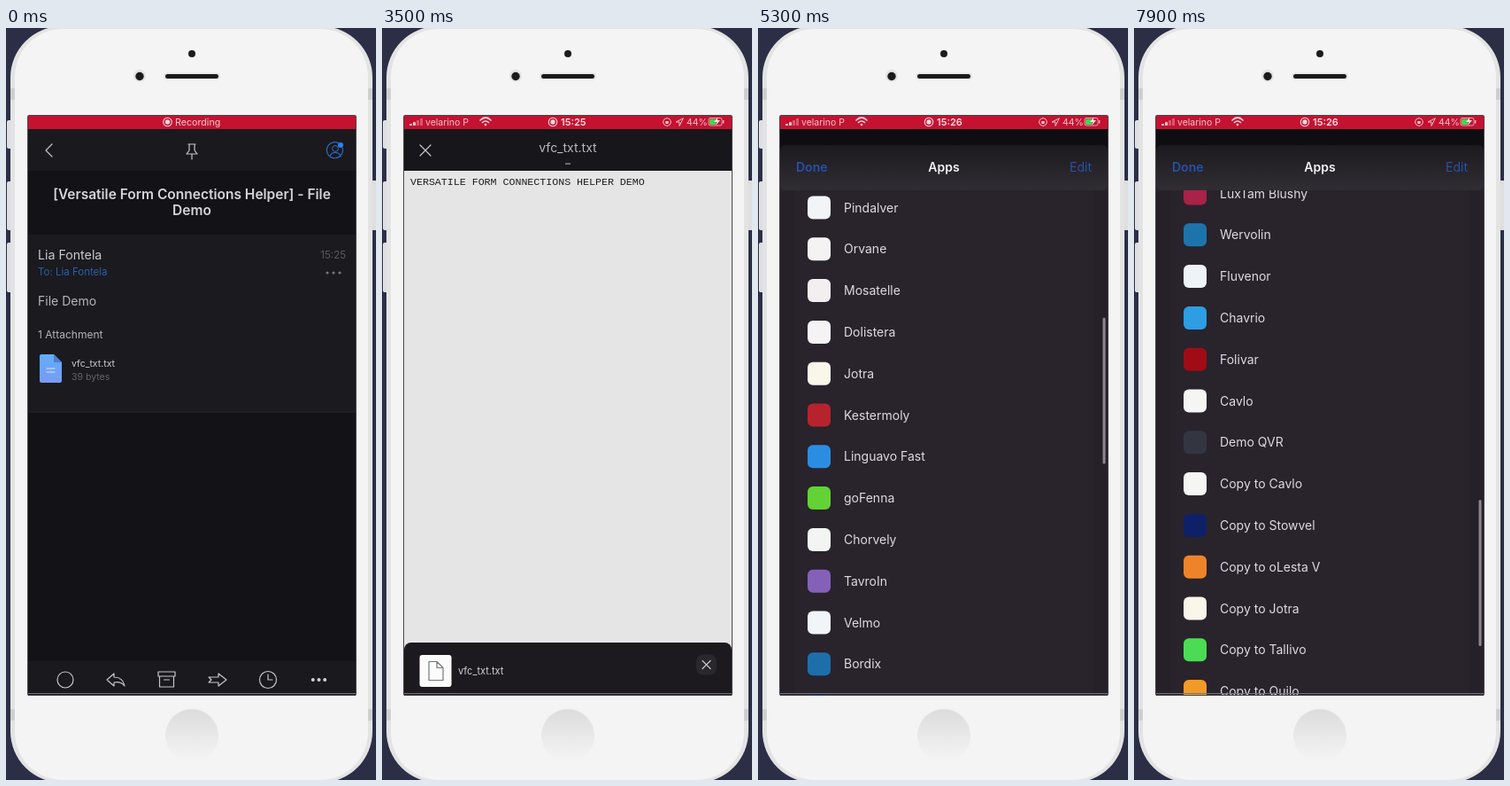
An HTML page for the animation above (8 s loop, 418 by 848 pixels).

```html
<!DOCTYPE html>
<html lang="en">
<head>
<meta charset="utf-8">
<title>Opening an attachment</title>
<style>
html, body { margin: 0; width: 100%; height: 100%; overflow: hidden; background: #2b2e45; }
svg { display: block; width: 418px; height: 848px; font-family: Inter, Roboto, sans-serif; }
.line { fill: none; stroke: #c6c5c9; stroke-width: 1.2; stroke-linecap: round; stroke-linejoin: round; }
</style>
</head>
<body>
<svg id="stage" viewBox="0 0 418 848"></svg>
<script>
const LOOP = 8000, STEP = 100;
const ROW = 46.8, FIRST_ROW = 308.5;
const FILE = 'vfc_txt.txt', PERSON = 'Lia Fontela';

const rect = (x, y, w, h, fill, r = 0, extra = '') =>
  `<rect x="${x}" y="${y}" width="${w}" height="${h}" rx="${r}" fill="${fill}" ${extra}/>`;
const circle = (x, y, r, fill, extra = '') =>
  `<circle cx="${x}" cy="${y}" r="${r}" fill="${fill}" ${extra}/>`;
const text = (x, y, size, fill, label, extra = '') =>
  `<text x="${x}" y="${y}" font-size="${size}" fill="${fill}" ${extra}>${label}</text>`;
const line = (d, extra = '') => `<path class="line" d="${d}" ${extra}/>`;
const group = (id, body) => `<g id="${id}">${body}</g>`;
const cross = (x, y, r) => line(`M${x - r} ${y - r}l${2 * r} ${2 * r}m0 ${-2 * r}l${-2 * r} ${2 * r}`);
const dots = (x, y, gap, r, fill) => [-1, 0, 1].map(i => circle(x + i * gap, y, r, fill)).join('');
const MID = 'text-anchor="middle"', END = 'text-anchor="end"', BOLD = 'font-weight="600"';

// name, tile colour
const apps = [
  ['Tomalune', '#2064b4'], ['Quillmar', '#55d365'], ['Drune', '#1f57ae'], ['Bravoli', '#515aa8'],
  ['Tresk', '#f4f2f4'], ['Pindalver', '#f2f4f8'], ['Orvane', '#f4f2f2'], ['Mosatelle', '#f3eef0'],
  ['Dolistera', '#f6f3f5'], ['Jotra', '#faf6ea'], ['Kestermoly', '#b5242d'], ['Linguavo Fast', '#2b8de2'],
  ['goFenna', '#62d234'], ['Chorvely', '#f2f5f2'], ['TavroIn', '#8560b8'], ['Velmo', '#f1f5f8'],
  ['Bordix', '#1d6fab'], ['Stowvel', '#0e2168'], ['Qorde', '#f0eff5'], ['Zivel', '#f6f1f2'],
  ['LuxTam Blushy', '#a82347'], ['Wervolin', '#1d74ab'], ['Fluvenor', '#edf3f7'], ['Chavrio', '#2d9de4'],
  ['Folivar', '#a00c16'], ['Cavlo', '#f5f5f3'], ['Demo QVR', '#333640'], ['Copy to Cavlo', '#f5f5f3'],
  ['Copy to Stowvel', '#0e2168'], ['Copy to oLesta V', '#ee842a'], ['Copy to Jotra', '#faf6ea'],
  ['Copy to Tallivo', '#4cdb55'], ['Copy to Quilo', '#f29a27']
];
const favorites = [['Skyvano', '#f2f4f8'], ['Textalia', '#55d365'], ['Pelu', '#2b91e8']];

const appRow = (y, [name, color]) =>
  rect(56, y - 13, 26, 26, color, 6) + text(97, y + 5, 14, '#dedbe0', name);

function phone() {
  const buttons = [[1, 104, 32], [1, 173, 55], [1, 242, 56], [412, 172, 56]]
    .map(([x, y, h]) => rect(x, y, 7, h, '#dfdfe1', 2)).join('');
  const seams = [68, 768].map(y => rect(5, y, 5, 13, '#cfcfd1') + rect(409, y, 5, 13, '#cfcfd1')).join('');
  return rect(0, 0, 418, 848, '#2b2e45') + buttons +
    rect(5, -2, 409, 853, '#e3e3e4', 58) + seams +
    rect(10, 1, 399, 847, '#f4f4f4', 54) +
    circle(210, 29, 4, '#1c1a1c') +
    circle(151, 54, 7, '#e4e4e5') + circle(151, 54.5, 4.7, '#1c1a1c') +
    rect(178, 50.5, 64, 8, '#e6e6e6', 4) + rect(180, 52, 60, 5, '#1c1a1c', 2.5) +
    circle(210, 798, 30, 'url(#home)');
}

function letter() {
  const blue = 'style="stroke:#2b6cc9"';
  return rect(25, 99, 370, 654, '#131217') +
    rect(25, 114, 370, 47, '#1a191e') + rect(25, 233, 370, 199, '#1b1a1f') +
    rect(25, 432, 370, 2, '#1f1e23') + rect(25, 714, 370, 38, '#1a191e') +
    line('M52 131l-7 7 7 7', 'stroke-width="1.5"') +
    line('M206 131h8m-7 0v7l-3 4h12l-3-4v-7m-3 11v6') +
    line('M376 130a9 9 0 1 0 4 5M366 145c1-6 11-6 12 0', blue) +
    circle(372, 136, 3.4, 'none', blue) + circle(378, 132, 3, '#2f7ff0') +
    text(210, 193, 15.5, '#d6d5d9', '[Versatile Form Connections Helper] - File', `${MID} ${BOLD}`) +
    text(210, 211, 15.5, '#d6d5d9', 'Demo', `${MID} ${BOLD}`) +
    text(36, 261, 14.2, '#cbcace', PERSON) +
    text(384, 260, 11.5, '#5b5a60', '15:25', END) +
    text(36, 279, 11.5, '#2a5fab', `To: ${PERSON}`) +
    dots(370, 276, 7, 1.6, '#77767b') +
    text(36, 313, 14, '#b7b6ba', 'File Demo') +
    text(36, 350, 12, '#b7b6ba', '1 Attachment') +
    '<path d="M40 368h14l9 9v21a2 2 0 0 1-2 2H40a2 2 0 0 1-2-2V370a2 2 0 0 1 2-2z" fill="url(#doc)"/>' +
    '<path d="M54 368l9 9h-9z" fill="#4b7fd2"/>' +
    line('M46 384h9m-9 4h9', 'style="stroke:#d5e5ff"') +
    text(74, 382, 10.5, '#d0cfd3', FILE) +
    text(74, 397, 10.5, '#66656a', '39 bytes') +
    circle(67, 735, 9, 'none', 'class="line"') +
    line('M114 735l8-7v4c7 0 11 4 12 10c-3-4-7-5-12-4v4z') +
    line('M172 726h19v5h-19zM173.5 731h16v12h-16zm5 4h6') +
    line('M249 735l-9-7v4h-11l3 3-3 3h11v4z') +
    circle(296, 735, 9.5, 'none', 'class="line"') + line('M296 729v6h5') +
    dots(353.5, 735, 6.7, 2, '#d0cfd3');
}

function viewer() {
  return rect(25, 114, 370, 639, '#17161b') + rect(25, 161, 370, 554, '#ffffff') +
    cross(49, 138, 6) +
    text(210, 139.5, 14, '#b9b8bd', FILE, MID) + rect(207, 152.5, 6, 1.2, '#a5a4a9') +
    text(32, 177, 11.62, '#222', 'VERSATILE FORM CONNECTIONS HELPER DEMO',
      'style="font-family:\'Liberation Mono\',\'Courier New\',monospace"') +
    line('M61 741h-2a5 5 0 0 1-1-10c1-7 11-8 13-2c6 0 7 10 1 12h-3M65 734v11m-3-3l3 3 3-3') +
    line('M218 726l-18 8 6 3 3 7zM218 726l-12 11') +
    line('M352 732h-4v12h14v-12h-4M355 738v-13m-3 3l3-3 3 3');
}

// Drawn at y = 0 and moved into place
function shareSheet() {
  return rect(25, 0, 370, 700, '#1c1a1e', 8) +
    rect(42.5, 14, 36, 36, '#fbfbfb', 3) +
    line('M53 21.5h9l7 7v14h-16zM62 21.5v7h7', 'style="stroke:#77767b"') +
    text(86, 36, 11, '#d3d2d6', FILE) +
    rect(355, 13.5, 23, 23, '#2a282d', 8) + cross(366.5, 25, 4.5);
}

function appSheet() {
  const rows = favorites.map((app, i) => appRow(196 + (i - 2) * ROW, app)).join('') +
    apps.map((app, i) => appRow(FIRST_ROW + i * ROW, app)).join('');
  const titles = text(50, 60, 16.5, '#f0eef2', 'Favorites', BOLD) +
    text(50, 273.5, 16.5, '#f0eef2', 'Suggestions', BOLD);
  return rect(25, 132, 370, 640, '#29232c', 8) +
    rect(25, 183, 17, 580, '#262129') + rect(379, 183, 16, 580, '#262129') +
    `<g clip-path="url(#listArea)">${group('list', titles + rows)}</g>` +
    rect(25, 132, 370, 51, 'url(#bar)', 6) +
    text(43, 162, 14, '#2452ad', 'Done', BOLD) +
    text(210, 162, 14, '#f2f0f4', 'Apps', `${MID} ${BOLD}`) +
    text(377, 162, 14, '#2452ad', 'Edit', END) +
    rect(389.5, 229, 3, 165, '#8d888f', 1.5, 'id="thumb"');
}

const recordIcon = x =>
  circle(x, 106, 4.8, 'none', 'stroke="#f3d3d9" stroke-width="1.1"') + circle(x, 106, 2.7, '#f3d3d9');

function statusBar() {
  const pale = '#edc3cb';
  const bars = [0, 1, 2, 3].map(i =>
    rect(31 + i * 4, 108 - i * 2, 3, 2 + i * 2, pale, .5, `opacity="${i < 2 ? 1 : .4}"`)).join('');
  const normal = bars + text(49, 109.5, 10.5, pale, 'velarino P') +
    line('M111 104c4-4 8-4 12 0M113.5 106.5c2-2 5-2 7 0', 'style="stroke:#f3d3d9;stroke-width:1.7"') +
    circle(117, 109, 1.3, '#f3d3d9') + recordIcon(193) +
    text(202, 109.7, 11, '#f8e2e6', '15:25', `${BOLD} id="clock"`) +
    circle(322, 106, 4.3, 'none', `stroke="${pale}"`) + rect(320.3, 105, 3.4, 3, pale) +
    line('M340 102l-8 4h4v4z', `style="stroke:${pale};stroke-width:1"`) +
    text(344, 109.5, 10.5, pale, '44%') +
    rect(369, 101.5, 15, 8.5, 'none', 2, `stroke="${pale}" stroke-width=".8"`) +
    rect(370, 102.5, 7, 6.5, '#42d455', 1) + rect(385, 104, 1.3, 3.5, pale) +
    '<path d="M379 101l-4 5h3l-1 4 5-6h-3z" fill="#f3e6e8"/>';
  return rect(25, 99, 370, 15, '#c41230') +
    group('recording', recordIcon(182.5) + text(191, 109.5, 10.7, '#f0ccd3', 'Recording')) +
    group('normal', normal);
}

const stage = document.getElementById('stage');
const gradient = (id, top, bottom) =>
  `<linearGradient id="${id}" x2="0" y2="1"><stop stop-color="${top}"/><stop offset="1" stop-color="${bottom}"/></linearGradient>`;
stage.innerHTML = `<defs>
  ${gradient('home', '#dcdcdd', '#f5f5f5')}${gradient('doc', '#62aefa', '#789bf2')}${gradient('bar', '#1c1a1f', '#302d33')}
  <clipPath id="screen">${rect(25, 99, 370, 654, '#000')}</clipPath>
  <clipPath id="listArea">${rect(25, 183, 370, 570, '#000')}</clipPath>
</defs>` + phone() +
  '<g clip-path="url(#screen)">' +
  letter() + group('viewer', viewer()) +
  rect(25, 161, 370, 592, '#000', 0, 'id="dim"') +
  group('share', shareSheet()) +
  rect(25, 114, 370, 639, '#0e0d11', 0, 'id="shade"') +
  group('apps', appSheet()) + statusBar() +
  rect(25, 750, 370, 1, '#77767b') + '</g>' +
  rect(24.5, 98.5, 371, 654, 'none', 1, 'stroke="#4a484d"');

const ui = Object.fromEntries(
  ['viewer', 'dim', 'share', 'shade', 'apps', 'list', 'thumb', 'recording', 'normal', 'clock']
    .map(id => [id, document.getElementById(id)]));
const move = (el, y) => el.setAttribute('transform', `translate(0 ${y.toFixed(2)})`);
const show = (el, visible) => el.setAttribute('display', visible ? 'inline' : 'none');

const easeOut = u => 1 - (1 - u) ** 2;
function track(keys, t) {
  const next = keys.findIndex(([time]) => time > t);
  if (next === 0) return keys[0][1];
  if (next < 0) return keys[keys.length - 1][1];
  const [t0, a] = keys[next - 1], [t1, b] = keys[next];
  return a + (b - a) * easeOut((t - t0) / (t1 - t0));
}

const viewerY = [[1200, 640], [1600, 0]];
const shareY = [[3200, 753], [3500, 693], [3900, 400]];
const dimming = [[3200, 0], [3500, .1], [3900, .2]];
const appsY = [[4000, 640], [4300, 0]];
const scroll = [[4300, -146], [4600, 0], [5300, 340], [6300, 751], [7900, 1058]];

function draw(t) {
  const offset = track(scroll, t);
  move(ui.viewer, track(viewerY, t));
  move(ui.share, track(shareY, t));
  move(ui.apps, track(appsY, t));
  move(ui.list, -offset);
  ui.thumb.setAttribute('y', 229 + offset * .2865);
  ui.dim.setAttribute('opacity', track(dimming, t));
  ui.shade.setAttribute('opacity', 1 - track(appsY, t) / 640);
  show(ui.viewer, t > 1200);
  show(ui.share, t > 3200);
  show(ui.apps, t > 4000);
  show(ui.recording, t < 1400);
  show(ui.normal, t >= 1400);
  ui.clock.textContent = t < 4000 ? '15:25' : '15:26';
}

const start = performance.now();
function tick() {
  const t = (performance.now() - start) % LOOP;
  draw(Math.floor(t / STEP) * STEP);
  requestAnimationFrame(tick);
}
tick();
</script>
</body>
</html>
```
